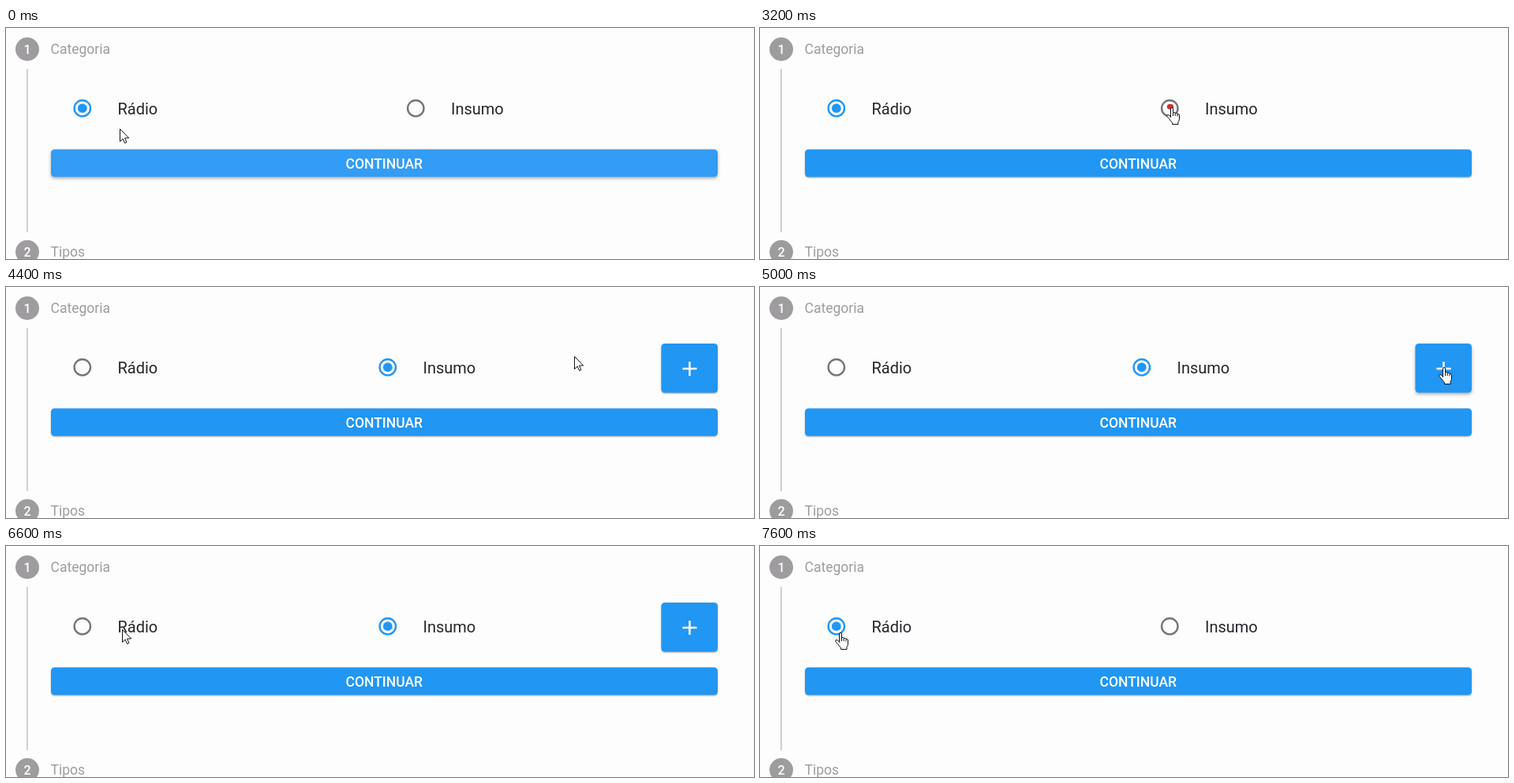
Write an HTML page with a canvas that moves like this. It is 948 by 294 pixels and loops after 8000 ms.

```html
<!DOCTYPE html>
<html lang="pt">
<head>
<meta charset="utf-8">
<title>Categoria</title>
<style>
html, body { margin: 0; width: 100%; height: 100%; overflow: hidden; background: #fdfdfd; }
canvas { display: block; width: 948px; height: 294px; }
</style>
</head>
<body>
<canvas id="stage" width="948" height="294"></canvas>
<script>
const ctx = document.getElementById('stage').getContext('2d');
const LOOP = 8000, STEP = 200;
const BLUE = '#2196f3', GREY = '#9e9c9e', INK = '#27252b';

// Pointer stops: time, x, y, shape (a = arrow, h = hand)
const stops = [
  [0, 144, 128, 'a'], [200, 335, 90, 'a'],
  [1000, 352, 91, 'a'], [1200, 398, 92, 'a'], [1400, 444, 93, 'a'],
  [1600, 490, 91, 'a'], [1800, 512, 98, 'h'], [2000, 515, 101, 'h'],
  [3800, 519, 101, 'h'], [4000, 532, 100, 'h'], [4200, 558, 98, 'h'],
  [4400, 720, 88, 'a'], [4600, 790, 92, 'a'], [4800, 838, 98, 'h'],
  [5000, 860, 102, 'h'], [5200, 870, 104, 'h'], [5400, 874, 105, 'h'],
  [5600, 875, 105, 'h'], [5800, 740, 97, 'a'], [6000, 434, 92, 'a'],
  [6200, 294, 92, 'a'], [6400, 132, 109, 'a'], [6600, 147, 106, 'a'],
  [6800, 122, 108, 'h'], [7000, 100, 110, 'h'], [7200, 95, 110, 'h']
];

const arrow = new Path2D('M.5.5V16.5L4.2 13 6.6 18.5 8.9 17.5 6.5 12H11.7Z');
const hand = new Path2D('M5.5 13V2Q5.5.5 7 .5T8.5 2V6.6Q11 5.6 11.2 7.4 13.8 6.6 14 8.4 ' +
  '16.5 8 16.5 10V14Q16.5 17 15 18.5V21.5H7.5V19.5Q5 17 3.5 14.5L.8 11.5Q.2 9.5 2 9.5 3.5 9.5 5.5 12Z');
const knuckles = new Path2D('M8.5 6.6V11M11.2 7.4V11M14 8.4V11.5');

function text(s, x, y, size, color, weight = 400, align = 'left') {
  ctx.font = `${weight} ${size}px Roboto, sans-serif`;
  ctx.textAlign = align;
  ctx.fillStyle = color;
  ctx.fillText(s, x, y);
}

function disc(x, y, r, color) {
  ctx.fillStyle = color;
  ctx.beginPath();
  ctx.arc(x, y, r, 0, Math.PI * 2);
  ctx.fill();
}

function stepHead(n, label, y) {
  disc(27, y, 15, GREY);
  text(n, 27, y + 5.7, 16, '#fff', 500, 'center');
  text(label, 56.5, y + 6, 17.5, GREY);
}

function radio(x, on, ripple) {
  const y = 102.2;
  if (ripple) disc(x, y, 23, 'rgba(33,150,243,.06)');
  ctx.strokeStyle = on ? BLUE : '#757575';
  ctx.lineWidth = 2.4;
  ctx.beginPath();
  ctx.arc(x, y, 10.2, 0, Math.PI * 2);
  ctx.stroke();
  if (on) disc(x, y, 5.9, BLUE);
}

function button(x, y, w, h, hover, color) {
  ctx.save();
  ctx.shadowColor = `rgba(0,0,0,${hover ? .32 : .36})`;
  ctx.shadowBlur = hover ? 4 : 2;
  ctx.shadowOffsetY = hover ? 2 : 1;
  ctx.fillStyle = color;
  ctx.beginPath();
  ctx.roundRect(x, y, w, h, 4.5);
  ctx.fill();
  ctx.restore();
}

function pointer(x, y, shape) {
  ctx.save();
  ctx.translate(x, y);
  const path = shape === 'a' ? arrow : hand;
  ctx.fillStyle = '#fff';
  ctx.strokeStyle = '#111';
  ctx.lineWidth = 1;
  ctx.lineJoin = 'round';
  ctx.fill(path);
  ctx.stroke(path);
  if (shape === 'h') ctx.stroke(knuckles);
  ctx.restore();
}

function draw(t) {
  t = Math.floor(t / STEP) * STEP;
  const during = (a, b) => t >= a && t < b;
  const supply = during(3400, 7200);
  const shift = supply ? -35.5 : 0;

  ctx.fillStyle = '#fdfdfd';
  ctx.fillRect(0, 0, 948, 294);
  ctx.fillStyle = '#bdbdbd';
  ctx.fillRect(26.2, 52, 1.4, 208);
  stepHead('1', 'Categoria', 27);
  stepHead('2', 'Tipos', 285);

  radio(96.8, !supply, during(7200, 7400));
  text('Rádio', 141.5, 109.5, 20, INK);
  radio(519.3 + shift, supply, during(3400, 3600));
  text('Insumo', 564 + shift, 109.5, 20, INK);

  const hover = t < 200;
  button(57, 154.5, 845, 35, hover, hover ? '#339cf4' : BLUE);
  text('CONTINUAR', 479.3, 178.5, 17.5, '#fff', 500, 'center');

  if (supply) {
    button(830.5, 72, 71.5, 62.5, during(5000, 5800), BLUE);
    ctx.fillStyle = '#fff';
    ctx.fillRect(857.5, 102.7, 18, 2.5);
    ctx.fillRect(865.2, 95, 2.5, 18);
  }

  if (during(3200, 3400)) {
    ctx.fillStyle = '#cf2f3a';
    ctx.beginPath();
    ctx.ellipse(520, 100.2, 4.2, 3.4, 0, 0, Math.PI * 2);
    ctx.fill();
  }

  const [, x, y, shape] = stops.findLast(s => s[0] <= t);
  pointer(x, y, shape);
}

const start = performance.now();
function tick() {
  draw((performance.now() - start) % LOOP);
  requestAnimationFrame(tick);
}
tick();
</script>
</body>
</html>
```
